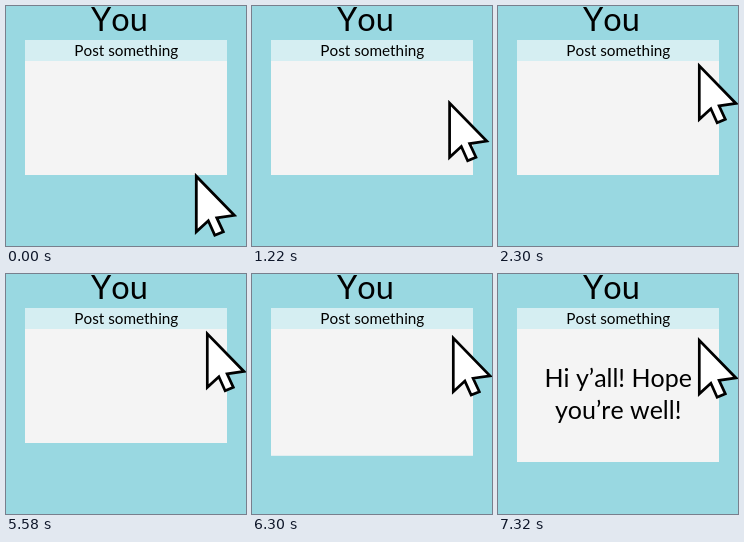
Write an HTML page that moves like this. It is 240 px wide and 240 px high and loops after 8000 ms.

```html
<!DOCTYPE html>
<html lang="en">
<head>
<meta charset="utf-8">
<title>Post something</title>
<style>
  html, body { margin: 0; width: 100%; height: 100%; overflow: hidden; background: #99d8e1; }
  svg { display: block; width: 100vw; height: 100vh; }
  text { font-family: Lato, "Open Sans", sans-serif; font-kerning: none; text-anchor: middle; }
</style>
</head>
<body>
<svg viewBox="0 0 240 240">
  <text x="113.5" y="25" font-size="32.5">You</text>
  <rect id="panel" x="19" y="55" width="202" height="114" fill="#f4f4f4"/>
  <rect x="19" y="34" width="202" height="21" fill="#d5eef2"/>
  <text x="120.3" y="50" font-size="15.3">Post something</text>
  <g id="message" font-size="25" opacity="0">
    <text x="120.2" y="113">Hi y’all! Hope</text>
    <text x="120.2" y="145">you’re well!</text>
  </g>
  <path id="pointer" d="M0 0V55.5L12 44.5L18.5 59L27 55.5L20.5 41.5L38 39Z"
        fill="#fff" stroke="#000" stroke-width="2.8"/>
</svg>
<script>
  const LOOP = 8000, STEP = 60;
  const panel = document.getElementById('panel');
  const message = document.getElementById('message');
  const pointer = document.getElementById('pointer');

  const clamp = v => Math.min(1, Math.max(0, v));
  const easeOut = p => 1 - (1 - p) ** 2;
  const mix = (a, b, p) => a + (b - a) * p;
  // Number of whole steps since a start time, as a share of all steps
  const progress = (t, start, count) => clamp(Math.floor((t - start) / STEP) / count);

  function draw(t) {
    const rise = easeOut(progress(t, 440, 31));
    const grow = easeOut(progress(t, 5580, 28));
    const x = mix(190.3, 201.3, rise);
    const y = mix(170.3, 59.8, rise) + 6.5 * grow;
    const size = mix(1, 0.965, rise);
    pointer.setAttribute('transform', `translate(${x} ${y}) scale(${size})`);
    panel.setAttribute('height', mix(114, 133, grow));
    message.setAttribute('opacity', progress(t, 6300, 10));
  }

  function tick() {
    draw(performance.now() % LOOP);
    requestAnimationFrame(tick);
  }
  tick();
</script>
</body>
</html>
```
